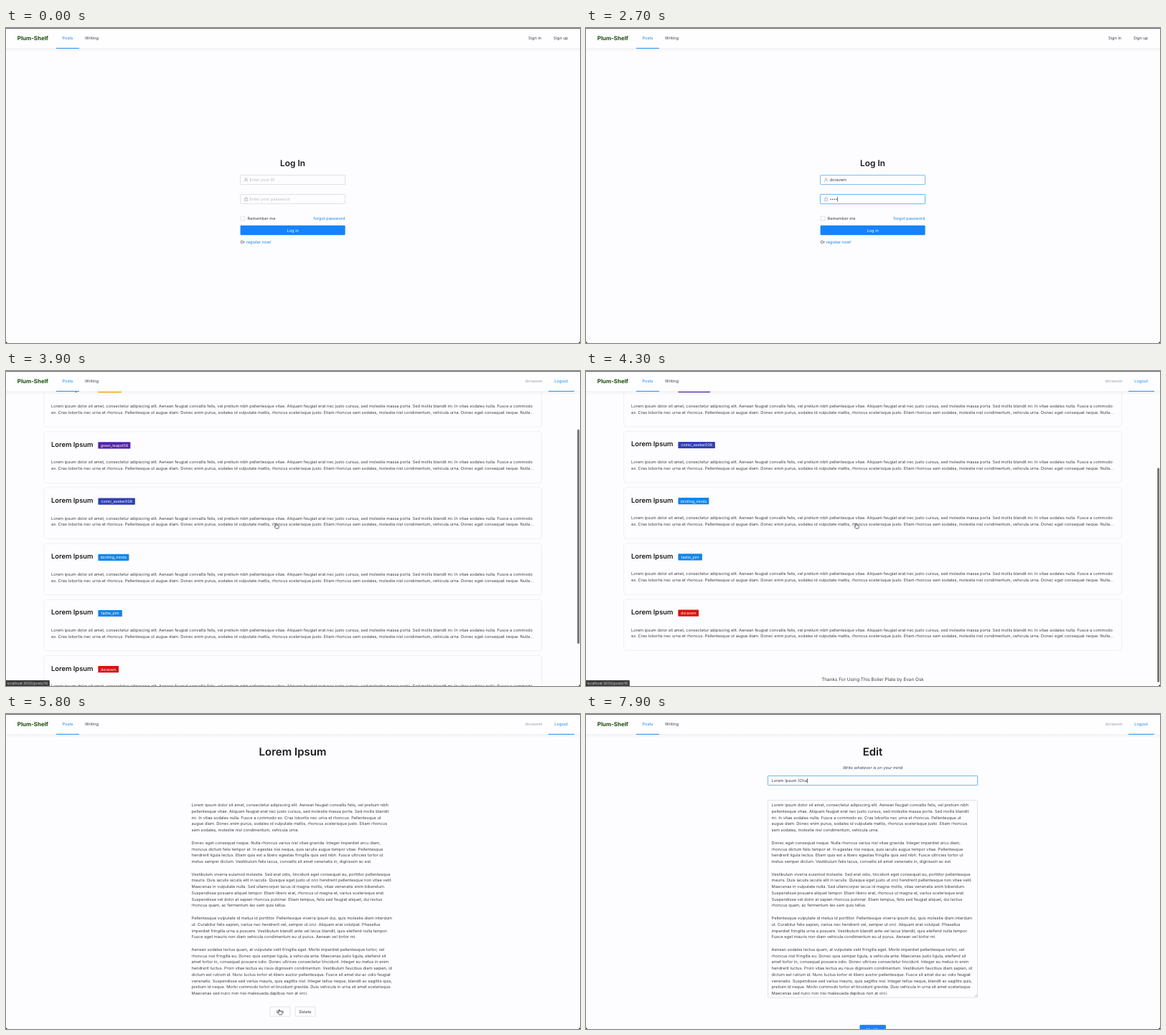
An HTML page that plays this animation: 800x440 px, repeating every 8 s.

```html
<!DOCTYPE html>
<html lang="en">
<head>
<meta charset="utf-8">
<title>Message board</title>
<style>
  html, body { margin: 0; width: 100%; height: 100%; overflow: hidden; background: #fdfcfe; }
  svg { display: block; width: 800px; height: 440px; }
  text { font-family: Inter, "Open Sans", sans-serif; text-rendering: geometricPrecision; white-space: pre; }
</style>
</head>
<body>
<svg id="stage" viewBox="0 0 800 440"></svg>
<script>
const LOOP = 8000;
const BODY = 5.7, INK = '#424243', HEAD = '#1c1c1c';
const BLUE = '#1689f2', LINE = '#d6d6d9', FAINT = '#ebebee', GRAY = '#bdbdc0';
const USER = 'doravem';
const stage = document.getElementById('stage');

function el(parent, tag, attrs) {
  const node = document.createElementNS('http://www.w3.org/2000/svg', tag);
  for (const key in attrs) node.setAttribute(key, attrs[key]);
  return parent.appendChild(node);
}
const group = parent => el(parent, 'g', {});
const show = (node, on) => node.setAttribute('visibility', on ? 'inherit' : 'hidden');
const fade = (node, a) => node.setAttribute('opacity', a);
const clamp = v => Math.max(0, Math.min(1, v));
const ramp = (t, from, length) => clamp((t - from) / length);

// y is the middle of the capitals
function text(parent, str, x, y, o = {}) {
  const size = o.size || BODY;
  const node = el(parent, 'text', {
    x, y: y + size * 0.36, 'font-size': size, fill: o.fill || INK,
    'font-weight': o.weight || 400, 'text-anchor': o.anchor || 'start'
  });
  if (o.italic) node.setAttribute('font-style', 'italic');
  node.textContent = str;
  return node;
}

const rect = (parent, x, y, width, height, fill, rx = 0) =>
  el(parent, 'rect', { x, y, width, height, fill, rx });

function frame(parent, x, y, width, height, stroke = LINE, rx = 0.8, w = 0.7) {
  return el(parent, 'rect', { x, y, width, height, rx, fill: 'none', stroke, 'stroke-width': w });
}

// Box with hover and focus outlines laid over the plain border
function field(parent, x, y, w, h) {
  frame(parent, x, y, w, h);
  const focus = frame(parent, x - 0.4, y - 0.4, w + 0.8, h + 0.8, '#c4e2fc', 1.2, 1);
  const hover = frame(parent, x, y, w, h, '#55b2f6');
  return { focus, hover };
}

function button(parent, label, x, y, w, h, primary) {
  if (primary) rect(parent, x, y, w, h, '#1682fc', 1.1);
  else frame(parent, x, y, w, h);
  text(parent, label, x + w / 2, y + h / 2, { anchor: 'middle', fill: primary ? '#fff' : INK });
}

/* ---------- login page ---------- */
const login = group(stage);
text(login, 'Log In', 399.6, 189, { size: 11.9, weight: 600, anchor: 'middle', fill: HEAD });
const idField = field(login, 326.6, 205.6, 146, 12.9);
const pwField = field(login, 326.6, 232.5, 146, 12.9);

const icon = { fill: 'none', stroke: '#a5a5a8', 'stroke-width': 0.6 };
el(login, 'path', { d: 'M332.3 214.7a2.3 2.5 0 0 1 4.6 0M333.2 210.9a1.4 1.4 0 1 0 2.8 0a1.4 1.4 0 1 0 -2.8 0', ...icon });
el(login, 'path', { d: 'M332.4 238.5h4.4v3h-4.4zM333.3 238.5v-1a1.3 1.3 0 0 1 2.6 0v1M334.6 239.5v1', ...icon });

const idHint = text(login, 'Enter your ID', 339.5, 212.1, { fill: GRAY });
const pwHint = text(login, 'Enter your password', 339.5, 239.1, { fill: GRAY });
const idText = text(login, '', 339.5, 212.1);
const dots = [0, 1, 2, 3].map(i =>
  el(login, 'circle', { cx: 341 + i * 2.65, cy: 239.2, r: 0.75, fill: INK }));

frame(login, 327, 263, 6, 6);
text(login, 'Remember me', 336.6, 266);
text(login, 'forgot password', 472.6, 266, { fill: BLUE, anchor: 'end' });
button(login, 'Log in', 326.6, 275.8, 146.1, 13.4, true);
const orText = text(login, 'Or ', 326.6, 298.9);
el(orText, 'tspan', { fill: BLUE }).textContent = 'register now!';

/* ---------- list page ---------- */
const posts = group(stage);
const excerpt = [
  'Lorem ipsum dolor sit amet, consectetur adipiscing elit. Aenean feugiat convallis felis, vel pretium nibh pellentesque vitae. Aliquam feugiat erat nec justo cursus, sed molestie massa porta. Sed mollis blandit mi. In vitae sodales nulla. Fusce a commodo',
  'ex. Cras lobortis nec urna et rhoncus. Pellentesque ut augue diam. Donec enim purus, sodales id vulputate mattis, rhoncus scelerisque justo. Etiam rhoncus sem sodales, molestie nisl condimentum, vehicula urna. Donec eget consequat neque. Nulla...'
];
const authors = [
  ['gentle_elk', '#f7ac14', 32.5],
  ['green_teapot58', '#5322ab', 45],
  ['comic_seeker008', '#3140b4', 51.5],
  ['strolling_minds', '#1286e8', 43],
  ['tastie_pim', '#1286e8', 33.5],
  [USER, '#d9140c', 28.7]
];
text(posts, 'Posts', 59.3, 48.8, { size: 11.7, weight: 600, fill: HEAD });
rect(posts, 59, 67, 682, 0.7, '#e6e6e9');
button(posts, 'Write', 386, 86.4, 27.2, 13.2);
authors.forEach(([name, color, w], i) => {
  const top = 113.8 + i * 78.2;
  frame(posts, 52.6, top, 694, 71.6, FAINT, 4);
  text(posts, 'Lorem Ipsum', 63, top + 17.8, { size: 9.35, weight: 600, fill: HEAD });
  rect(posts, 128.4, top + 14.6, w, 9.2, color, 0.9);
  text(posts, name, 128.4 + w / 2, top + 19.3, { size: 5.2, fill: '#fff', anchor: 'middle' });
  excerpt.forEach((line, k) => text(posts, line, 63, top + 42.6 + k * 8.77));
});
text(posts, 'Thanks For Using This Boiler Plate by Evan Osk', 399.5, 616.8, { size: 6.4, anchor: 'middle' });

/* ---------- single post and edit pages ---------- */
const story = `Lorem ipsum dolor sit amet, consectetur adipiscing elit. Aenean feugiat convallis felis, vel pretium nibh
pellentesque vitae. Aliquam feugiat erat nec justo cursus, sed molestie massa porta. Sed mollis blandit
mi. In vitae sodales nulla. Fusce a commodo ex. Cras lobortis nec urna et rhoncus. Pellentesque ut
augue diam. Donec enim purus, sodales id vulputate mattis, rhoncus scelerisque justo. Etiam rhoncus
sem sodales, molestie nisl condimentum, vehicula urna.

Donec eget consequat neque. Nulla rhoncus varius nisl vitae gravida. Integer imperdiet arcu diam,
rhoncus dictum felis tempor et. In egestas nisi neque, quis iaculis augue tempor vitae. Pellentesque
hendrerit ligula lectus. Etiam quis est a libero egestas fringilla quis sed nibh. Fusce ultricies tortor ut
metus semper dictum. Vestibulum felis lacus, convallis sit amet venenatis in, dignissim ac est.

Vestibulum viverra euismod molestie. Sed erat odio, tincidunt eget consequat eu, porttitor pellentesque
mauris. Duis iaculis iaculis elit in iaculis. Quisque eget justo ut orci hendrerit pellentesque non vitae velit.
Maecenas in vulputate nulla. Sed ullamcorper lacus id magna mollis, vitae venenatis enim bibendum.
Suspendisse posuere aliquet tempor. Etiam libero erat, rhoncus ut magna et, varius scelerisque erat.
Suspendisse vel dolor at sapien rhoncus pulvinar. Etiam tempus, felis sed feugiat aliquet, dui lectus
rhoncus quam, ac fermentum leo sem quis tellus.

Pellentesque vulputate id metus id porttitor. Pellentesque viverra ipsum dui, quis molestie diam interdum
ut. Curabitur felis sapien, varius nec hendrerit vel, semper ut orci. Aliquam erat volutpat. Phasellus
imperdiet fringilla urna a posuere. Vestibulum blandit ante vel lacus blandit, quis eleifend nulla tempor.
Fusce eget mauris non diam vehicula condimentum eu ut purus. Aenean vel tortor mi.

Aenean sodales lectus quam, at vulputate velit fringilla eget. Morbi imperdiet pellentesque tortor, vel
rhoncus nisl fringilla eu. Donec quis semper ligula, a vehicula ante. Maecenas justo ligula, eleifend sit
amet tortor in, consequat posuere odio. Donec ultrices consectetur tincidunt. Integer eu metus in enim
hendrerit luctus. Proin vitae lectus eu risus dignissim condimentum. Vestibulum faucibus diam sapien, id
dictum est rutrum id. Nunc luctus tortor et libero auctor pellentesque. Fusce sit amet dui ac odio feugiat
venenatis. Suspendisse sed varius mauris, quis sagittis nisl. Integer tellus neque, blandit ac sagittis quis,
pretium id neque. Morbi commodo tortor et tincidunt gravida. Duis vehicula in urna sit amet scelerisque.
Maecenas sed nunc non nisi malesuada dapibus non at orci.`.split('\n');

const body = group(stage);
story.forEach((line, i) => text(body, line, 258.6, 127.1 + i * 8.77));

const bigTitle = { size: 15, weight: 600, anchor: 'middle', fill: HEAD };
const detail = group(stage);
text(detail, 'Lorem Ipsum', 399.5, 52.2, bigTitle);
button(detail, 'Edit', 368, 409, 28, 13.2);
button(detail, 'Delete', 403, 409, 28, 13.2);

const edit = group(stage);
text(edit, 'Edit', 399.5, 52.2, bigTitle);
text(edit, 'Write whatever is on your mind', 399.6, 74.7, { italic: true, anchor: 'middle' });
const titleField = field(edit, 253.6, 86.5, 292, 12.9);
const titleText = text(edit, '', 258.6, 93.1);
frame(edit, 253.6, 120.5, 292, 275.6);
el(edit, 'path', { d: 'M542 395l3-3M543.8 395l1.2-1.2', stroke: '#8a8a8a', 'stroke-width': 0.5 });
button(edit, 'Modify', 381.5, 434.2, 36.4, 13.4, true);

/* ---------- navigation bar ---------- */
const shade = el(el(stage, 'defs', {}), 'linearGradient', { id: 'shade', x2: 0, y2: 1 });
el(shade, 'stop', { offset: 0, 'stop-color': '#000', 'stop-opacity': 0.035 });
el(shade, 'stop', { offset: 1, 'stop-color': '#000', 'stop-opacity': 0 });
const nav = group(stage);
rect(nav, 0, 28.4, 800, 6, 'url(#shade)');
rect(nav, 0, 0, 800, 28.4, '#fefdff');
rect(nav, 0, 28, 800, 0.6, '#efeff1');
const underline = (parent, x, w) => rect(parent, x, 27.8, w, 1, BLUE);
text(nav, 'Plum-Shelf', 15.8, 14.5, { size: 7.9, weight: 700, fill: '#174d08' });
text(nav, 'Posts', 78.4, 14.3, { fill: BLUE });
underline(nav, 70, 32);
text(nav, 'Writing', 110, 14.3);
const guest = group(nav);
text(guest, 'Sign in', 728, 14.3);
text(guest, 'Sign up', 763, 14.3);
const member = group(nav);
text(member, USER, 747.6, 14.3, { fill: '#b4b4b7', weight: 600, anchor: 'end' });
text(member, 'Logout', 764.3, 14.3, { fill: BLUE });
underline(member, 756, 36);

/* ---------- window chrome ---------- */
const bar = rect(stage, 796.2, 8, 3, 299.5, '#747477', 1.5);
const status = group(stage);
const statusBox = rect(status, -2, 432, 62.8, 10, '#3b3b3d', 1.2);
const statusText = text(status, '', 1.4, 436.2, { size: 5, fill: '#d8d8da' });
rect(stage, 0, 0, 800, 1, '#626264');
el(stage, 'path', { d: 'M0 437.4V440H2.6Q.3 439.7 0 437.4M800 437.4V440H797.4Q799.7 439.7 800 437.4', fill: '#111' });

const caret = rect(stage, 0, 0, 0.6, 6.6, '#111');
const pointer = group(stage);
const shapes = {
  arrow: el(pointer, 'path', { d: 'M0 0V7L1.6 5.5L2.7 8L3.8 7.5L2.7 5.1H5Z', fill: '#111', stroke: '#fff', 'stroke-width': 0.4 }),
  beam: el(pointer, 'path', { d: 'M-1.3-3.2Q0-3.2 0-2.4Q0-3.2 1.3-3.2M0-2.4V2.4M-1.3 3.2Q0 3.2 0 2.4Q0 3.2 1.3 3.2', fill: 'none', stroke: '#222', 'stroke-width': 0.8 }),
  hand: el(pointer, 'path', {
    d: 'M-1.6-3Q-1-3.9-.4-3V-.9L2.4-.3Q3.3 0 3.2 1.1L2.5 4H-1.2L-3.1 1.2Q-3.2.2-2.3.4L-1.6 1Z',
    fill: '#fff', stroke: '#333', 'stroke-width': 0.7, 'stroke-linejoin': 'round'
  })
};

/* ---------- timeline ---------- */
const T = {
  click: 1000, typeId: 1200, tab: 1950, typePw: 2150, list: 3000,
  open: 5250, edit: 6000, focus: 6950
};
const moves = [
  [200, 462, 296], [900, 377, 214], [3000, 377, 214], [3400, 377.3, 216],
  [4500, 377.3, 216], [4850, 326.8, 368], [5500, 326.8, 368],
  [5800, 382, 416], [6050, 382, 416], [6600, 456.3, 95.2], [LOOP, 456.3, 95.2]
];
const titleKeys = [7350, 7550, 7750, 7820, 7880];

function pointerAt(t) {
  let i = 0;
  while (i < moves.length - 2 && t >= moves[i + 1][0]) i++;
  const [t0, x0, y0] = moves[i], [t1, x1, y1] = moves[i + 1];
  const p = ramp(t, t0, t1 - t0), e = p * p * (3 - 2 * p);
  return [x0 + (x1 - x0) * e, y0 + (y1 - y0) * e];
}

// Steady drag, then a glide that slows to a stop at the page end
function scrollAt(t) {
  const end = 193, speed = 107 / 350;
  if (t <= 3900) return Math.max(0, t - 3550) * speed;
  const rest = end - 107, p = ramp(t, 3900, 2 * rest / speed);
  return 107 + rest * (1 - (1 - p) * (1 - p));
}

function pointerShape(t, x, y) {
  if (t < T.list) return y < 219 ? 'beam' : 'arrow';
  if (t < T.open) return 'hand';
  if (t < T.edit) return t < 5750 ? 'arrow' : 'hand';
  return y < 100 || (y > 120 && y < 396) ? 'beam' : 'arrow';
}

const width = node => node.textContent ? node.getComputedTextLength() : 0;
const dotCount = t => Math.max(0, Math.min(4, Math.floor((t - T.typePw) / 130) + 1));

function placeCaret(t) {
  let at = null;
  if (t >= T.click && t < T.tab) at = [339.8 + width(idText), 212.1];
  else if (t >= T.tab && t < T.list) at = [339.8 + 2.65 * dotCount(t), 239.1];
  else if (t >= T.focus) at = [258.9 + width(titleText), 93.1];
  show(caret, at);
  if (at) caret.setAttribute('transform', `translate(${at[0]} ${at[1] - 3.3})`);
}

function render(t) {
  const onLogin = t < T.list, onList = !onLogin && t < T.open, onEdit = t >= T.edit;
  show(login, onLogin);
  show(guest, onLogin);
  show(member, !onLogin);
  show(posts, onList);
  show(body, t >= T.open);
  show(detail, t >= T.open && !onEdit);
  show(edit, onEdit);

  const typed = Math.max(0, Math.min(USER.length, Math.floor((t - T.typeId) / 85) + 1));
  idText.textContent = USER.slice(0, typed);
  show(idHint, !typed);
  fade(idField.hover, ramp(t, 800, 300));
  fade(idField.focus, ramp(t, T.click, 200) * (1 - ramp(t, T.tab, 250)));
  const count = dotCount(t);
  dots.forEach((dot, i) => show(dot, onLogin && i < count));
  show(pwHint, onLogin && !count);
  fade(pwField.hover, ramp(t, T.tab, 200));
  fade(pwField.focus, ramp(t, T.tab, 200));

  const scroll = scrollAt(t);
  posts.setAttribute('transform', `translate(0 ${-scroll})`);
  bar.setAttribute('transform', `translate(0 ${scroll * 0.685})`);
  show(bar, onList);
  fade(bar, 1 - ramp(t, 4600, 250));
  const last = t >= 4600;
  show(status, onList && t >= 3100);
  statusText.textContent = 'localhost:3000/posts/' + (last ? 6 : 16);
  statusBox.setAttribute('width', last ? 59.6 : 62.8);

  const keys = titleKeys.filter(k => t >= k).length;
  titleText.textContent = 'Lorem Ipsum' + ' (Cha'.slice(0, keys);
  fade(titleField.hover, ramp(t, 6500, 200));
  fade(titleField.focus, ramp(t, T.focus, 200));
  placeCaret(t);

  const [x, y] = pointerAt(t), kind = pointerShape(t, x, y);
  pointer.setAttribute('transform', `translate(${x} ${y})`);
  for (const name in shapes) show(shapes[name], name === kind);
  const hidden = t < 200 || (t >= T.typeId && t < 3050) || t >= titleKeys[0];
  pointer.setAttribute('display', hidden ? 'none' : 'inline');
}

const start = performance.now();
function tick() {
  render((performance.now() - start) % LOOP);
  requestAnimationFrame(tick);
}
render(0);
requestAnimationFrame(tick);
</script>
</body>
</html>
```
